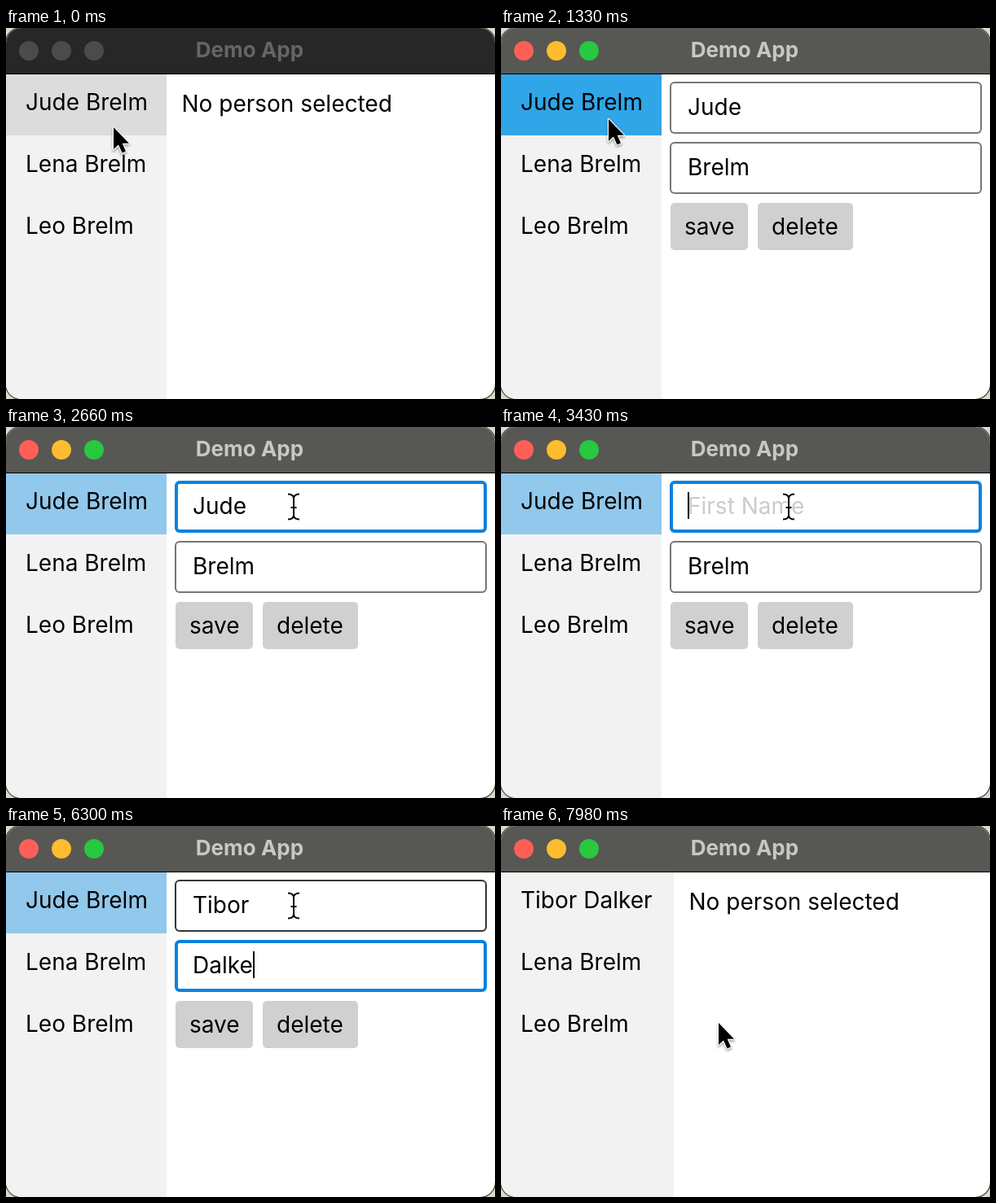
Recreate the animation shown at these times as an HTML page. Size 600 px wide and 456 px high, loop 8000 ms.

```html
<!DOCTYPE html>
<html lang="en">
<head>
<meta charset="utf-8">
<title>Demo App</title>
<style>
* { box-sizing: border-box; }
html, body { margin: 0; width: 100%; height: 100%; overflow: hidden; background: #ded9cd; }
#app {
  position: absolute; left: 0; top: 0; width: 600px; height: 456px;
  overflow: hidden; border-radius: 19px; background: #fff;
  box-shadow: 0 0 0 1.5px #55534e;
  font: 28px/34px Inter, sans-serif; color: #000; white-space: nowrap; cursor: none;
}
#app div, #app svg { position: absolute; left: 0; top: 0; }
#app #bar { width: 600px; height: 57px; background: #272727; border-bottom: 1px solid #000; }
#bar b { position: absolute; left: 0; top: 11px; width: 598px; text-align: center; font: 700 26px/32px Inter, sans-serif; color: #656565; }
#bar i { position: absolute; top: 16px; width: 24px; height: 24px; border-radius: 50%; background: #4b4b4b; }
#bar i:nth-of-type(1) { left: 16px; }
#bar i:nth-of-type(2) { left: 56px; }
#bar i:nth-of-type(3) { left: 96px; }
#app.active #bar { background: #575754; }
.active #bar b { color: #c7c7c6; }
.active #bar i:nth-of-type(1) { background: #ff5f57; }
.active #bar i:nth-of-type(2) { background: #febc2e; }
.active #bar i:nth-of-type(3) { background: #28c840; }
#app #side { top: 57px; width: 197px; height: 399px; background: #f2f2f2; }
#app .row { width: 100%; height: 75px; padding: 17px 0 0 24px; }
#app .row:nth-child(2) { top: 76px; }
#app .row:nth-child(3) { top: 152px; }
.row.hover { background: #dcdcdc; }
.row.picked { background: #92c8ec; }
.row.picked.hover { background: #30a5e7; }
#app #none { left: 215.5px; top: 76px; }
#app.saved #side { width: 212px; }
#app.saved #none { left: 230.5px; }
#app .field { left: 207px; width: 383px; height: 64px; border-radius: 6px; background: #fff; box-shadow: inset 0 0 0 2px #767676; }
#app #first { top: 66px; }
#app #last { top: 140px; }
#app .field.hover { box-shadow: inset 0 0 0 2px #363636; }
#app .field.focus { box-shadow: inset 0 0 0 4px #0a82dd; }
.field span { position: absolute; left: 22px; top: 14px; height: 34px; }
.field.all span { background: #0a82dd; }
.field em { position: absolute; left: 22px; top: 14px; font-style: normal; color: #cbcbcb; }
.caret { position: absolute; left: 100%; top: 0; width: 2px; height: 33px; background: #000; }
#app .button { top: 215px; height: 58px; padding: 12px 0 0 17px; border-radius: 5px; background: #d0d0d0; }
#app #save { left: 208px; width: 95px; }
#app #delete { left: 315px; width: 117px; }
#app .button.hover { background: #dadada; }
#arrow, #beam { overflow: visible; }
#arrow { filter: drop-shadow(0 2px 1.5px rgba(0, 0, 0, .35)); }
</style>
</head>
<body>
<div id="app">
  <div id="bar"><i></i><i></i><i></i><b>Demo App</b></div>
  <div id="side">
    <div class="row" id="entry">Jude Brelm</div>
    <div class="row">Lena Brelm</div>
    <div class="row">Leo Brelm</div>
  </div>
  <div id="none">No person selected</div>
  <div id="form">
    <div class="field" id="first"><em>First Name</em><span></span></div>
    <div class="field" id="last"><em>Last Name</em><span></span></div>
    <div class="button" id="save">save</div>
    <div class="button" id="delete">delete</div>
  </div>
  <svg id="arrow" width="24" height="36">
    <path d="M1 1V28L7 22.5L11.5 32.5L16 30.5L11.7 20.8H20Z" stroke="#fff" stroke-width="2.4" stroke-linejoin="round" paint-order="stroke"/>
  </svg>
  <svg id="beam" width="1" height="1" fill="none">
    <g id="stem"><path d="M-7 -15.5Q0 -15.5 0 -10V10Q0 15.5 -7 15.5M7 -15.5Q0 -15.5 0 -10M0 10Q0 15.5 7 15.5M-3.5 1H3.5"/></g>
  </svg>
</div>
<script>
const $ = id => document.getElementById(id);
const LOOP = 8000, PICK = 770, FOCUS = 2100, TAB = 4620, SAVE = 7770;

// [time, x, y] of the pointer
const path = [
  [70, 131, 121], [280, 131, 111], [1470, 131, 111], [1820, 353, 98],
  [6650, 353, 98], [7420, 266, 241]
];
// [time, text] of each key press
const firstKeys = [
  [0, "Jude"], [2870, "Jud"], [3010, "Ju"], [3150, "J"], [3290, ""],
  [3570, "T"], [3850, "Ti"], [4060, "Tib"], [4270, "Tibo"], [4410, "Tibor"]
];
const lastKeys = [
  [0, "Brelm"], [5530, "D"], [5740, "Da"], [5880, "Dal"],
  [6160, "Dalk"], [6230, "Dalke"], [6440, "Dalker"]
];

const beam = $("stem").firstChild;
beam.setAttribute("stroke", "#fff");
beam.setAttribute("stroke-width", 4.5);
const core = beam.cloneNode();
core.setAttribute("stroke", "#000");
core.setAttribute("stroke-width", 2);
$("stem").append(core);

function pointer(t) {
  let i = path.findIndex(p => p[0] > t);
  if (i < 0) i = path.length;
  const a = path[Math.max(0, i - 1)], b = path[Math.min(i, path.length - 1)];
  const k = b[0] > a[0] ? (t - a[0]) / (b[0] - a[0]) : 0;
  const e = k * k * (3 - 2 * k);
  return [a[1] + (b[1] - a[1]) * e, a[2] + (b[2] - a[2]) * e];
}

const latest = (keys, t) => keys.filter(k => k[0] <= t).pop();
const inside = ([x, y], l, t, r, b) => x >= l && x < r && y >= t && y < b;

function flags(el, map) {
  for (const name in map) el.classList.toggle(name, map[name]);
}

function drawField(el, keys, t, hover, focusAt, focusEnd, selected) {
  const [since, text] = latest(keys, t);
  const focus = t >= focusAt && t < focusEnd;
  const blink = (t - Math.max(since, focusAt)) % 1000 < 500;
  const span = el.querySelector("span");
  span.textContent = text;
  el.querySelector("em").hidden = text !== "";
  if (focus && !selected && blink) {
    const caret = document.createElement("i");
    caret.className = "caret";
    span.append(caret);
  }
  flags(el, { hover, focus, all: selected });
}

function draw(t) {
  const pos = pointer(t), picked = t >= PICK && t < SAVE, saved = t >= SAVE;
  const onFirst = picked && inside(pos, 207, 66, 590, 130);
  const onLast = picked && inside(pos, 207, 140, 590, 204);
  const onText = onFirst || onLast;

  flags($("app"), { active: t >= PICK, saved });
  flags($("entry"), { picked, hover: inside(pos, 0, 57, 197, 132) });
  $("entry").textContent = saved ? "Tibor Dalker" : "Jude Brelm";
  $("none").style.display = picked ? "none" : "";
  $("form").style.display = picked ? "" : "none";

  drawField($("first"), firstKeys, t, onFirst, FOCUS, TAB, false);
  drawField($("last"), lastKeys, t, onLast, TAB, SAVE, t >= TAB && t < lastKeys[1][0]);
  flags($("save"), { hover: inside(pos, 208, 215, 303, 273) });

  const [x, y] = pos;
  $("arrow").style.transform = $("beam").style.transform = `translate(${x}px, ${y}px)`;
  $("arrow").style.display = onText ? "none" : "";
  $("beam").style.display = onText ? "" : "none";
}

function tick() {
  draw(performance.now() % LOOP);
  requestAnimationFrame(tick);
}
tick();
</script>
</body>
</html>
```
